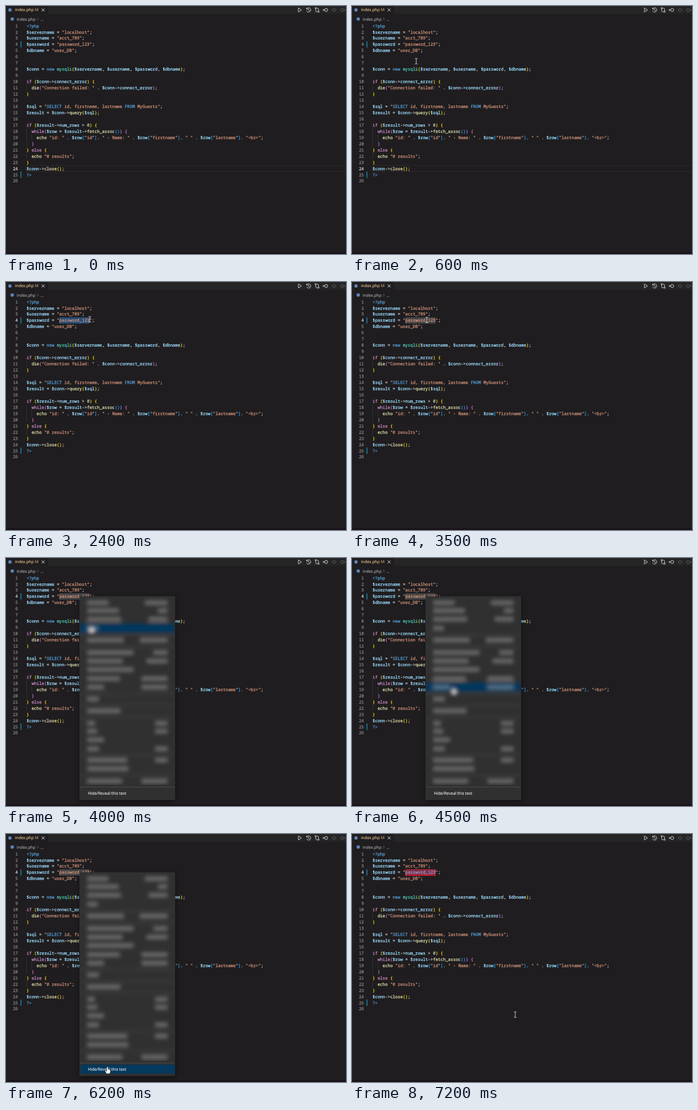
Recreate the animation shown at these times as an HTML page. Size 600 px wide and 438 px high, loop 7.3 s.

```html
<!DOCTYPE html>
<html lang="en">
<head>
<meta charset="utf-8">
<title>Hide text in the editor</title>
<style>
  html, body { margin: 0; width: 100%; height: 100%; overflow: hidden; background: #1f1d1f; }
  svg { display: block; width: 600px; height: 438px; }
  text { white-space: pre; text-rendering: geometricPrecision; fill: currentColor; stroke: currentColor; }
  .code { font: 7.4px "Noto Sans Mono", "DejaVu Sans Mono", monospace; stroke-width: .28; }
  .ui { font: 7.1px "Open Sans", "Noto Sans", sans-serif; stroke-width: .15; }
  .icons { fill: none; stroke: #d0d0d0; stroke-width: 1; }
  .dim { stroke: #555; }
</style>
</head>
<body>
<svg id="stage" viewBox="0 0 600 438">
  <defs>
    <filter id="blur" x="-10%" y="-10%" width="120%" height="120%"><feGaussianBlur stdDeviation="3.7"/></filter>
    <filter id="shade" x="-10%" y="-10%" width="120%" height="120%"><feGaussianBlur stdDeviation="4"/></filter>
    <clipPath id="above"><rect x="130" y="68" width="168" height="333"/></clipPath>
    <clipPath id="below"><rect y="401" width="600" height="37"/></clipPath>
    <path id="hand" d="M-1.2 .8Q0-.8 1.2 .8V4.6L4.6 5.4Q5.6 5.8 5.4 7.2L4.4 12.2H-1.6L-4.4 7.6Q-4.2 6.2-3 6.8L-1.2 8.2Z"
      fill="#fff" stroke="#222" stroke-width=".6"/>
  </defs>

  <rect width="600" height="438" fill="#1f1d1f"/>
  <rect width="600" height="14" fill="#252526"/>
  <rect width="74" height="14.5" fill="#1f1d1f"/>
  <rect y="435" width="600" height="3" fill="#181317"/>

  <g class="ui">
    <circle cx="7" cy="7" r="3" fill="#5c83b8"/>
    <text x="16" y="9.4" color="#e2c08d">index.php</text>
    <text x="51" y="9.4" color="#b39a70">M</text>
    <path d="M63 4.5l5 5m0-5l-5 5" stroke="#eee" stroke-width="1"/>
    <circle cx="11" cy="23" r="3" fill="#5c83b8"/>
    <text x="19" y="25.5" color="#a9a9a9">index.php</text>
    <path d="M55 21l2.2 2.2-2.2 2.2" fill="none" stroke="#999" stroke-width=".7"/>
    <text x="60.5" y="25.5" color="#a9a9a9">...</text>
  </g>

  <g class="icons">
    <path d="M516 3.4v7.2l5.6-3.6z"/>
    <path d="M531 4.6a3.8 3.8 0 1 1-.5 3.8M530.4 3v2.4h2.4M534 4.8v2.6l2 1"/>
    <path d="M546.5 4.5v4q0 1.6 1.6 1.6h1.6M551.5 9v-3.5q0-1.6-1.6-1.6h-1.5"/>
    <circle cx="546.5" cy="3.8" r="1.2"/><circle cx="551.5" cy="10" r="1.2"/>
    <circle cx="565" cy="7" r="2.7"/><path d="M562 7h-2.6m1.3-1.5l-1.5 1.5 1.5 1.5"/>
    <g class="dim"><circle cx="579" cy="7" r="2.7"/><path d="M574.5 7h1.8m5.4 0h1.8"/>
    <circle cx="593" cy="7" r="2.7"/><path d="M596 7h2.6m-1.3-1.5l1.5 1.5-1.5 1.5"/></g>
  </g>

  <rect id="lineBox" x="36" width="570" height="10.6" fill="none" stroke="#2d2b2d"/>
  <rect id="pick" x="94.1" y="62.4" height="11"/>
  <g id="code" class="code"></g>

  <g id="marked">
    <rect x="93.8" y="62.4" width="54" height="11.4" fill="#d01825"/>
    <rect x="94.4" y="63.4" width="52.6" height="8.4" fill="#264f78" opacity=".52"/>
    <text class="code" x="94.1" y="70.4" color="#a58dbd">password_123</text>
  </g>

  <g id="menu">
    <rect x="131" y="71" width="167" height="358" fill="#000" opacity=".55" filter="url(#shade)"/>
    <rect x="130" y="68" width="168" height="359" rx="2" fill="#303031" stroke="#3c3c3d" stroke-width=".6"/>
    <g clip-path="url(#above)"><g filter="url(#blur)">
      <rect id="softHover" x="130" width="168" height="16" fill="#04395e"/>
      <g id="rows"></g>
      <use id="softHand" href="#hand"/>
    </g></g>
    <path d="M130.5 404.5h167" stroke="#505051" stroke-width=".9"/>
    <rect id="hover" x="132" y="407.5" width="166" height="15.5" fill="#04395e"/>
    <text class="ui" x="144.5" y="417.8" color="#e8e8e8">Hide/Reveal this text</text>
    <g clip-path="url(#below)"><use id="sharpHand" href="#hand"/></g>
  </g>

  <path id="beam" d="M-2.3-4.8H-.6L0-4.3 .6-4.8H2.3M0-4.3V4.3M-2.3 4.8H-.6L0 4.3 .6 4.8H2.3"
    fill="none" stroke="#e4e4e4" stroke-width=".9"/>
</svg>

<script>
const LOOP = 7300, STEP = 100, CHAR = 4.446, LEFT = 36.3, PITCH = 10.957;
const SELECT_AT = 900, SELECTED = 1600, UNFOCUSED = 3400, MENU_OPEN = 3700, MENU_CLOSE = 6400;

const source = `<?php
$servername = "localhost";
$username = "acct_789";
$password = "password_123";
$dbname = "user_DB";


$conn = new mysqli($servername, $username, $password, $dbname);

if ($conn->connect_error) {
  die("Connection failed: " . $conn->connect_error);
}

$sql = "SELECT id, firstname, lastname FROM MyGuests";
$result = $conn->query($sql);

if ($result->num_rows > 0) {
  while($row = $result->fetch_assoc()) {
    echo "id: " . $row["id"]. " - Name: " . $row["firstname"]. " " . $row["lastname"]. "<br>";
  }
} else {
  echo "0 results";
}
$conn->close();
?>
`;

const blue = '#569cd6', sky = '#9cdcfe', cream = '#dcdcaa', mauve = '#c586c0', rust = '#ce9178';
const words = { if: mauve, else: mauve, while: mauve, new: blue, mysqli: '#4ec9b0', echo: cream, 0: '#b5cea8' };
const brackets = ['#ffd700', '#da70d6', '#179fff'];

const $ = id => document.getElementById(id);
const lineY = n => 35 + (n - 1) * PITCH;

function add(parent, tag, attrs, text) {
  const el = document.createElementNS('http://www.w3.org/2000/svg', tag);
  for (const key in attrs) el.setAttribute(key, attrs[key]);
  if (text) el.textContent = text;
  return parent.appendChild(el);
}

let depth = 0;
function tint(token, rest) {
  if (/^(<\?php|\?>)$/.test(token)) return blue;
  if ('([{'.includes(token)) return brackets[depth++ % 3];
  if (')]}'.includes(token)) return brackets[--depth % 3];
  if (token[0] === '$') return sky;
  if (/^\w/.test(token)) return words[token] || (rest[0] === '(' ? cream : sky);
  return '#d4d4d4';
}

const numbers = source.split('\n').map((line, i) => {
  const y = lineY(i + 1) + 2.55;
  const put = (text, col, color) => add($('code'), 'text', { x: LEFT + col * CHAR, y, color }, text);
  for (const m of line.matchAll(/<\?php|\?>|"[^"]*"|\$\w+|\w+|->|\S/g)) {
    const token = m[0];
    let col = m.index;
    if (token[0] !== '"') {
      put(token, col, tint(token, line.slice(col + token.length)));
      continue;
    }
    for (const part of token.split(/(SELECT|FROM)/)) {
      put(part, col, /^(SELECT|FROM)$/.test(part) ? blue : rust);
      col += part.length;
    }
  }
  return add($('code'), 'text', { x: 21, y, 'text-anchor': 'end' }, String(i + 1));
});

// Change bars in the gutter, then indent guides: x, first line, line count
for (const n of [4, 25])
  add($('code'), 'rect', { x: 25.6, y: lineY(n) - 5.5, width: 1.6, height: 11, fill: '#1b81a8' });
for (const [x, n, count] of [[36.5, 11, 1], [36.5, 18, 3], [36.5, 22, 1], [45.3, 19, 1]])
  add($('code'), 'rect', { x, y: lineY(n) - 5.5, width: .6, height: count * PITCH, fill: '#434143' });

// Menu rows: centre, label width, shortcut width
const rows = [
  [79, 38, 40], [93, 56, 17], [108, 60, 33], [124, 19, 0], [145, 65, 49], [167, 82, 25], [182, 63, 37],
  [197, 82, 0], [213, 58, 46], [228, 30, 46], [249, 21, 0], [270, 59, 0], [292, 14, 22], [306, 18, 22],
  [321, 30, 0], [337, 21, 22], [357, 71, 22], [372, 73, 0], [394, 62, 46]
];
for (const [y, label, keys] of rows) {
  const bar = (x, width) => add($('rows'), 'rect', { x, y: y - 4, width, height: 8, fill: '#c4c4c4', opacity: .4 });
  bar(143, label);
  if (keys) bar(285 - keys, keys);
}
for (const y of [135, 156, 239, 260, 281, 347.5, 383])
  add($('rows'), 'rect', { x: 130, y, width: 168, height: 1, fill: '#777', opacity: .5 });

// Pointer hot spot: time, x, y
const path = [
  [100, 210, 250], [700, 94, 67], [900, 94, 67], [1300, 138, 62], [1600, 148, 66], [2400, 148, 66],
  [3200, 132, 67], [3600, 132, 67], [4000, 150, 120], [4500, 179, 229], [4800, 180, 392], [5200, 180, 398],
  [5500, 178, 413], [5600, 178, 413], [5800, 179, 411], [6400, 179, 411], [6800, 225, 366], [7200, 288, 319]
];

function pointer(t) {
  const i = path.findIndex(p => p[0] >= t);
  if (i < 1) return path[i < 0 ? path.length - 1 : 0].slice(1);
  const [a, b] = [path[i - 1], path[i]];
  const k = (t - a[0]) / (b[0] - a[0]);
  return [1, 2].map(n => a[n] + (b[n] - a[n]) * k);
}

const show = (id, on) => $(id).setAttribute('visibility', on ? 'inherit' : 'hidden');

function draw(now) {
  const t = Math.floor(now % LOOP / STEP) * STEP;
  const [x, y] = pointer(t);
  const menu = t >= MENU_OPEN && t < MENU_CLOSE;
  const active = t < 800 ? 24 : 4;

  numbers.forEach((el, i) => el.setAttribute('color', i + 1 === active ? '#d0d0d0' : '#858585'));
  $('lineBox').setAttribute('y', lineY(active) - 5.3);
  show('lineBox', t <= SELECT_AT);

  const dragged = Math.max(0, Math.min(12, Math.round((x - 94) / CHAR)));
  const chars = t < SELECT_AT ? 0 : t < SELECTED ? dragged : 12;
  $('pick').setAttribute('width', chars * CHAR);
  $('pick').setAttribute('fill', t < UNFOCUSED ? '#264f78' : '#464648');
  show('marked', t >= MENU_CLOSE);

  show('menu', menu);
  const row = rows.find(r => Math.abs(r[0] - y) < 8);
  $('softHover').setAttribute('y', row ? row[0] - 8 : 0);
  show('softHover', row);
  show('hover', y > 405);

  const place = `translate(${x} ${y})`;
  for (const id of ['softHand', 'sharpHand', 'beam']) $(id).setAttribute('transform', place);
  show('beam', t > 0 && !menu);
}

const start = performance.now();
function tick() {
  draw(performance.now() - start);
  requestAnimationFrame(tick);
}
tick();
</script>
</body>
</html>
```
